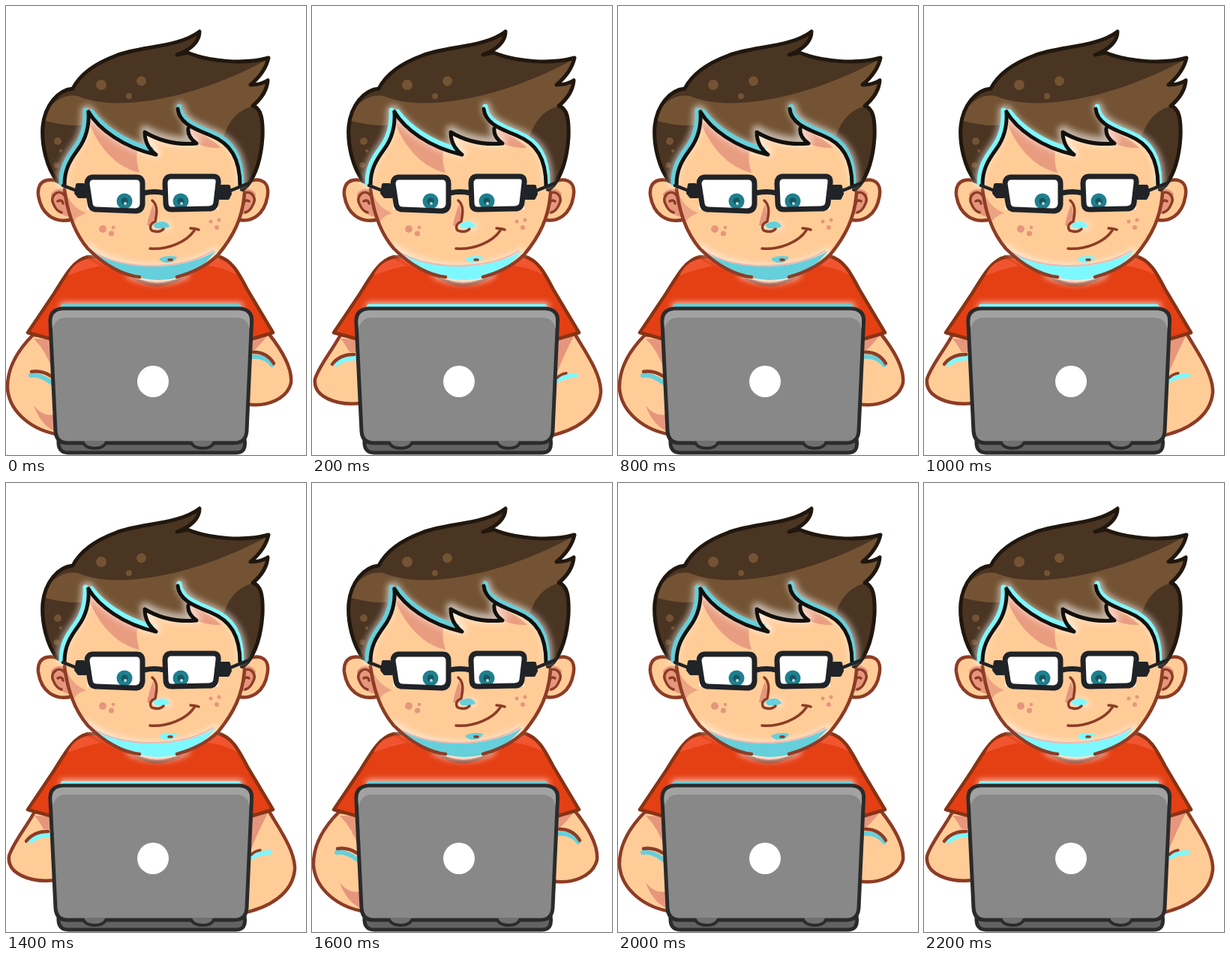
Write an HTML page that moves like this. It is 400 px wide and 598 px high and loops after 2400 ms.

```html
<!DOCTYPE html>
<html lang="en">
<head>
<meta charset="utf-8">
<title>Boy typing on a laptop</title>
<style>
  html, body { margin: 0; width: 100%; height: 100%; overflow: hidden; background: #fff; }
  svg { display: block; width: 400px; height: 598px; --glow: #65d0db; }
  .skin { fill: #ffcc98; }
  .shade { fill: #e6967c; }
  .edge { stroke: #8d3c25; stroke-width: 4.5; }
  .thin { stroke-width: 3.5; }
  .line { fill: none; }
  .cyan { fill: var(--glow); }
  .beam { fill: none; stroke: var(--glow); }
  .halo { fill: none; stroke: #fff; filter: url(#soft); }
  .frame { stroke: #202327; }
</style>
</head>
<body>
<svg viewBox="0 0 400 598" stroke-linecap="round" stroke-linejoin="round">
  <defs>
    <filter id="soft" filterUnits="userSpaceOnUse" x="0" y="0" width="400" height="598"><feGaussianBlur stdDeviation="4"/></filter>
    <path id="hair" d="M68 233C54 215 47 184 49 160C52 132 69 112 89 110C99 90 120 76 147 66C179 53 229 56 258 34C258 48 245 59 228 65L242 62C270 74 318 78 350 69C347 83 339 94 326 105C335 105 343 103 349 99C348 113 341 123 329 133C340 136 343 150 342 175C340 205 332 226 322 239L310 250L300 260H90L78 238Z"/>
    <path id="face" d="M78 238C78 218 85 206 96 191C108 175 111 158 110 141C123 163 155 188 200 198C191 191 185 181 185 168C208 182 231 185 254 183C247 178 242 171 243 163C258 170 282 175 298 191C309 203 313 221 312 246L318 248C318 282 303 307 283 331C260 354 235 366 203 367C160 366 133 347 109 323C91 302 81 275 78 238Z"/>
    <path id="leftLock" d="M78 238C78 218 85 206 96 191C108 175 111 158 110 141"/>
    <path id="fringe" d="M110 141C123 163 155 188 200 198C191 191 185 181 185 168C208 182 231 185 254 183C247 178 242 171 243 163"/>
    <path id="rightLock" d="M229 137C231 157 253 164 274 173C299 183 312 203 312 239"/>
    <clipPath id="inHair"><use href="#hair"/></clipPath>
    <clipPath id="inFace"><use href="#face"/></clipPath>
    <clipPath id="inLens"><rect x="108" y="228" width="74" height="43"/><rect x="212" y="228" width="71" height="43"/></clipPath>
  </defs>

  <g id="armsDown">
    <path class="skin edge" d="M36 438C14 460 1 484 2 510C5 542 36 566 72 571L64 440Z"/>
    <path class="shade" d="M37 443L59 444L62 487Q55 461 37 443ZM37 532Q48 547 64 544L66 567Q46 558 37 532Z"/>
    <path class="beam" stroke-width="6" d="M33 492Q46 490 61 502"/>
    <path class="edge line" d="M34 487Q48 485 60 493"/>
    <path class="skin edge" d="M350 436C366 456 382 482 380 502C375 523 348 535 320 530L328 440Z"/>
    <path class="shade" d="M328 441L350 438Q338 452 327 463Z"/>
    <path class="beam" stroke-width="6" d="M330 467Q346 466 355 478"/>
    <path class="edge line" d="M330 461Q348 461 357 476"/>
  </g>
  <g id="armsUp">
    <path class="skin edge" d="M38 438C26 460 9 480 4 497C1 520 32 533 66 529L62 440Z"/>
    <path class="shade" d="M38 443L59 444V461L50 461Q44 450 38 443Z"/>
    <path class="beam" stroke-width="6" d="M33 477Q42 469 57 469"/>
    <path class="edge line" d="M27 477Q37 464 56 464"/>
    <path class="skin edge" d="M350 436C364 460 386 490 385 515C382 546 352 566 314 573L328 440Z"/>
    <path class="shade" d="M328 441L350 438Q337 462 326 490Z"/>
    <path class="beam" stroke-width="6" d="M327 499Q338 492 352 492"/>
    <path class="edge line thin" d="M327 495Q332 490 339 489"/>
  </g>

  <path fill="#e53f14" stroke="#873314" stroke-width="4.500" d="M109 334C89 339 78 361 64 383L29 435L62 444H326L356 435L322 378C310 355 301 338 282 333Z"/>
  <path fill="#f0552f" d="M82 359Q91 340 109 337L126 346Q106 350 82 359ZM308 358Q299 341 283 336L269 346Q289 348 308 358Z"/>
  <path class="halo" stroke-width="9" opacity=".75" d="M76 400H312"/>
  <path class="shade edge" d="M167 359Q201 384 240 358Z"/>

  <path class="skin edge" d="M80 239C61 226 41 230 43 251C46 276 64 291 89 284Z"/>
  <path class="skin edge" d="M314 239C335 225 351 232 349 250C346 278 327 291 304 283Z"/>
  <path class="shade" d="M60 250Q70 238 81 248L87 281Q63 279 60 250ZM333 250Q324 238 312 248L306 280Q330 278 333 250Z"/>
  <path class="edge line thin" d="M78 252C69 242 58 254 63 263C66 271 70 274 74 275M76 263Q75 257 69 260M315 252C324 242 335 254 330 263C327 271 323 274 319 275M317 263Q318 257 324 260"/>

  <use href="#hair" fill="#4a3422"/>
  <g clip-path="url(#inHair)" fill="#735333">
    <path d="M48 152C57 130 76 116 96 120C150 143 255 122 347 72L345 132C318 132 299 144 289 178L254 190H110L106 158C88 161 68 157 48 152Z"/>
    <circle cx="127" cy="105" r="7"/><circle cx="180.500" cy="100" r="6.500"/><circle cx="164" cy="120" r="4"/>
    <circle cx="69" cy="180" r="5"/><circle cx="73" cy="193" r="2.200"/><circle cx="67" cy="212" r="3.800"/>
  </g>
  <use href="#hair" fill="none" stroke="#20170e" stroke-width="5"/>

  <use href="#face" class="skin"/>
  <g clip-path="url(#inFace)">
    <path class="shade" opacity=".85" d="M109 151C120 183 145 215 178 222Q172 204 176 190L120 148ZM243 164Q270 172 287 189Q266 190 247 180Z"/>
    <path class="shade" opacity=".75" d="M78 238Q82 266 107 276Q88 282 91 293L78 280Z"/>
  </g>
  <path class="halo" stroke-width="9" opacity=".6" d="M108 321C148 354 229 359 280 327M165 358Q203 374 240 358M197 293H216"/>
  <path class="cyan" d="M107 320C148 352 229 357 280 326C258 354 236 364 203 365C160 363 130 344 107 320Z"/>
  <path fill="none" stroke="#e9b9b4" stroke-width="2" d="M115 327C155 352 234 353 276 326"/>
  <path class="edge line" d="M78 244C82 277 91 302 109 323C133 347 158 359 178 361M228 361C250 355 270 344 283 331C303 307 316 282 318 248"/>

  <g class="halo" stroke-width="12" opacity=".6">
    <use href="#leftLock" x="-4" y="-2"/><use href="#fringe" y="-3"/><use href="#rightLock" x="3" y="-3"/>
  </g>
  <g class="beam" stroke-width="7">
    <use href="#leftLock" x="-4" y="-2"/>
    <path d="M114 141C130 162 158 182 193 191"/>
    <use href="#rightLock" x="2" y="-3"/>
  </g>
  <g fill="none" stroke="#12100d" stroke-width="5">
    <use href="#leftLock"/><use href="#fringe"/><use href="#rightLock"/>
  </g>

  <g class="shade">
    <circle cx="129" cy="297" r="5"/><circle cx="140.500" cy="303" r="3.600"/><circle cx="143" cy="295" r="2.300"/>
    <circle cx="273" cy="287" r="2.500"/><circle cx="284" cy="285" r="2.500"/><circle cx="281" cy="295" r="3"/>
    <path d="M196 264Q190 280 188 292L193 294L200 279Z"/>
  </g>
  <path class="cyan" d="M196 292Q200 287 210 287Q217 289 218 294Q211 297 200 296Z"/>
  <path class="edge line thin" d="M195 259C203 266 201 277 199 287C190 291 191 299 198 300Q205 302 210 297"/>
  <path class="edge line thin" d="M192 323C216 325 241 314 251 299M246 296Q252 296 257 298"/>
  <path class="cyan" d="M204 337Q212 331 228 334Q226 341 215 342Q208 342 204 337Z"/>
  <path class="edge line thin" d="M217 338H221"/>

  <g clip-path="url(#inLens)">
    <path fill="#fff" d="M100 220H290V280H100Z"/>
    <g id="eyes"></g>
  </g>
  <g class="frame" fill="none" stroke-width="7">
    <path d="M115 228H174Q182 228 182 237V264Q181 273 172 273L121 271Q113 271 112 263L108 237Q108 229 115 228Z"/>
    <path d="M219 227H277Q284 227 283 236L280 262Q279 270 270 270L221 271Q213 271 213 262L212 236Q212 228 219 227Z"/>
    <path d="M184 249Q198 246 211 249"/>
    <path d="M76 239L94 246M299 246L324 236" stroke-width="4.500"/>
    <path fill="#202327" stroke-width="4" d="M95 238H103L106 254H97L93 249ZM287 240H297L299 250L296 256H285Z"/>
  </g>

  <path class="beam" stroke-width="6" d="M76 400H310"/>
  <g stroke="#2b2b2b" stroke-width="5">
    <path fill="#636363" d="M72 577H318Q321 595 307 595H83Q69 595 70 579Z"/>
    <path fill="#888" d="M76 403H311Q329 404 327.500 421L321 566Q320 582 304 582H82Q67 582 66 566L59 421Q58 404 76 403Z"/>
    <path fill="#a2a2a2" stroke="none" d="M76 405.500H311Q325 406 325 420V430Q322 416 308 415H78Q66 416 62 430L61.500 420Q62 406 76 405.500Z"/>
    <path fill="#707070" stroke="none" d="M104 579H133Q131 589 118 589Q106 589 104 579ZM248 579H276Q274 589 262 589Q250 589 248 579Z"/>
    <path fill="none" stroke-width="4" d="M103 582Q107 589 118 589Q130 589 133 582M247 582Q251 589 262 589Q274 589 277 582"/>
  </g>
  <circle cx="196" cy="500" r="21" fill="#fff"/>
</svg>
<script>
  const svg = document.querySelector('svg');
  const armsDown = document.getElementById('armsDown');
  const armsUp = document.getElementById('armsUp');
  const STEP = 200;

  const eye = (x, y) => `<circle cx="${x}" cy="${y}" r="10.500" fill="#1f7f8d"/>
    <circle cx="${x}" cy="${y}" r="4.500" fill="#165663"/>
    <circle cx="${x + 1}" cy="${y + 3}" r="2" fill="#b5dde2"/>`;
  document.getElementById('eyes').innerHTML = eye(158, 260) + eye(233, 260);

  function draw(time) {
    const up = Math.floor(time / STEP) % 2 === 1;
    armsDown.style.display = up ? 'none' : '';
    armsUp.style.display = up ? '' : 'none';
    svg.style.setProperty('--glow', up ? '#7ef8ff' : '#65d0db');
  }

  const start = performance.now();
  function tick() {
    draw(performance.now() - start);
    requestAnimationFrame(tick);
  }
  tick();
</script>
</body>
</html>
```
